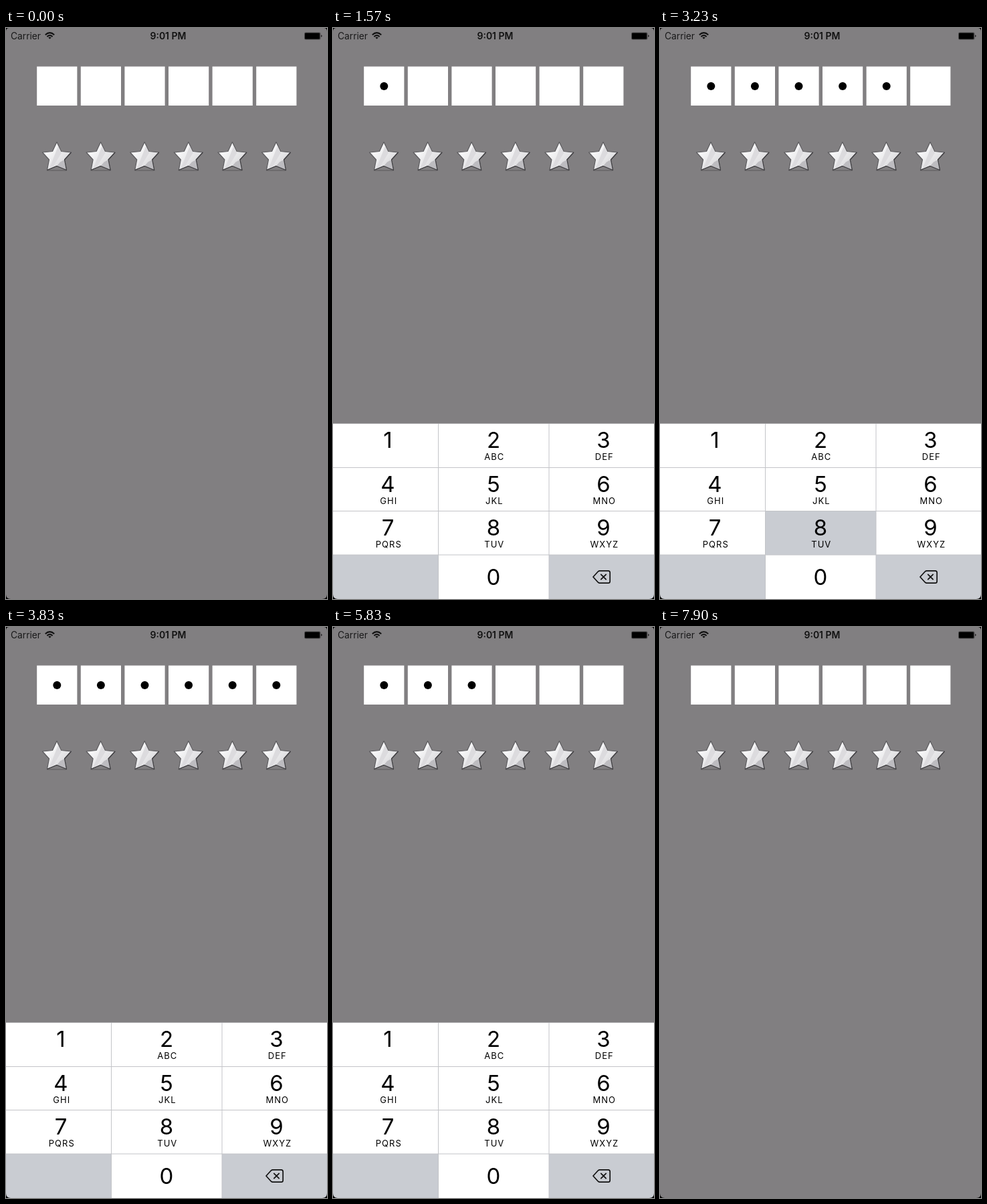
An HTML page for the animation above (8 s loop, 480x854 px).

```html
<!DOCTYPE html>
<html lang="en">
<head>
<meta charset="utf-8">
<title>Passcode entry</title>
<style>
  html, body { margin: 0; width: 100%; height: 100%; overflow: hidden; background: #000; }
  svg { display: block; width: 480px; height: 854px; }
  text { font-family: Inter, Roboto, "Liberation Sans", sans-serif; text-anchor: middle; }
  .digit { font-size: 33px; }
  .letters { font-size: 13px; letter-spacing: 1px; }
</style>
</head>
<body>
<svg viewBox="0 0 480 854">
  <defs>
    <linearGradient id="shine" x1="0" y1="0" x2="1" y2="1">
      <stop offset=".3" stop-color="#f6f6f7"/>
      <stop offset="1" stop-color="#cfced1"/>
    </linearGradient>
    <g id="star" stroke-linejoin="round">
      <path d="M-15 20.500H15" stroke="#4b4a4c" stroke-width="1.2" opacity=".6"/>
      <path d="M0-22 6.500-8 21.500-6.500 11.500 4.500 14.500 20 0 14-14.500 20-11.500 4.500-21.500-6.500-6.500-8Z"
            fill="url(#shine)" stroke="#5b5a5d" stroke-width="1.2"/>
      <path d="M2-16 7-6-5 14-11 17Z" fill="#dcdbde"/>
      <path d="M11.500 4.500 14.500 20 0 14 5 8Z" fill="#bdbcc0"/>
      <path d="M21.500-6.500 11.500 4.500 14.500 20 0 14-14.500 20" fill="none" stroke="#3f3e41" stroke-width="1.2"/>
    </g>
  </defs>

  <rect width="480" height="854" fill="#817f81"/>
  <text x="29.500" y="17" font-size="13.800" fill="#19191a">Carrier</text>
  <g fill="none" stroke="#111" stroke-width="2">
    <path d="M58.800 10.200Q65.500 4 72.200 10.200M61.400 12.900Q65.500 9.200 69.600 12.900"/>
    <path d="M63.300 14.300Q65.500 12.600 67.700 14.300L65.500 16.500Z" fill="#111" stroke="none"/>
  </g>
  <text x="242.500" y="17" font-size="14" font-weight="600" fill="#111">9:01 PM</text>
  <rect x="446" y="6.500" width="24.500" height="11" rx="2" opacity=".4"/>
  <rect x="447" y="7.500" width="22" height="9" rx="1"/>
  <path d="M471.300 10.300q2.500 1.700 0 3.400Z"/>

  <g id="slots"></g>
  <g id="pad"><rect y="591" width="480" height="264" fill="#fff"/></g>

  <path d="M0 0H480V854H0ZM5 0Q0 0 0 5V847Q0 854 7 854H473Q480 854 480 847V5Q480 0 475 0Z"
        fill-rule="evenodd"/>
</svg>
<script>
const LOOP = 8000, STEP = 1000 / 15, PAD_HEIGHT = 263;
const GRAY = '#c9ccd2', WHITE = '#fff';
const COLS = [0, 157.5, 323, 480], ROWS = [591, 657.5, 722.5, 788, 855];
const CENTERS = [82, 240, 404.5], BASELINES = [628, 693.8, 759, 832.5];
const KEYS = '123456789 0<';
const LETTERS = ['', 'ABC', 'DEF', 'GHI', 'JKL', 'MNO', 'PQRS', 'TUV', 'WXYZ'];

// key, press time, release time
const PRESSES = [
  ['2', 1430, 1570], ['3', 1830, 1970], ['6', 2370, 2430],
  ['5', 2770, 2900], ['8', 3100, 3300], ['7', 3700, 3830],
  ['<', 4970, 5100], ['<', 5370, 5500], ['<', 5700, 5830], ['<', 5970, 6100],
  ['<', 6500, 6630], ['<', 6830, 6970], ['<', 7100, 7230]
];

const slots = document.getElementById('slots');
const pad = document.getElementById('pad');

function add(parent, tag, attrs, text = '') {
  const node = document.createElementNS('http://www.w3.org/2000/svg', tag);
  for (const name in attrs) node.setAttribute(name, attrs[name]);
  node.textContent = text;
  return parent.appendChild(node);
}

const dots = Array.from({ length: 6 }, (_, i) => {
  const cx = 76.3 + i * 65.6;
  add(slots, 'rect', { x: cx - 30.1, y: 57.6, width: 60.2, height: 58.4, fill: WHITE });
  add(slots, 'use', { href: '#star', x: cx - .3, y: 192.5 });
  return add(slots, 'circle', { cx, cy: 87, r: 6 });
});

const keys = [...KEYS].map((key, i) => {
  const col = i % 3, row = Math.floor(i / 3);
  const x = COLS[col], y = ROWS[row];
  const rect = add(pad, 'rect', { x, y, width: COLS[col + 1] - x, height: ROWS[row + 1] - y });
  if (key !== '<') add(pad, 'text', { class: 'digit', x: CENTERS[col], y: BASELINES[row] }, key);
  if (LETTERS[i]) {
    add(pad, 'text', { class: 'letters', x: CENTERS[col] + 1.3, y: BASELINES[row] + 17.8 }, LETTERS[i]);
  }
  return rect;
});
add(pad, 'path', {
  d: 'M0 657.500H480M0 722.500H480M0 788H480M157.500 591V854M323 591V854',
  stroke: '#c3c4c8', fill: 'none'
});
add(pad, 'path', { d: 'M0 591.500H480', stroke: '#a3a2a5' });
const eraser = add(pad, 'path', {
  d: 'M389 821 396.500 812.800Q397.500 811.800 399 811.800H411.500Q414.200 811.800 414.200 814.500V827.500Q414.200 830.200 411.500 830.200H399Q397.500 830.200 396.500 829.200Z',
  stroke: '#111', 'stroke-width': 1.7, 'stroke-linejoin': 'round'
});
const cross = add(pad, 'path', {
  d: 'M400.300 816.800 408.700 825.200M408.700 816.800 400.300 825.200', 'stroke-width': 1.7
});

// Critically damped spring from 0 to 1
function spring(ms) {
  const x = Math.max(0, ms) * .0183;
  return 1 - (1 + x) * Math.exp(-x);
}

function padOffset(t) {
  if (t < 499 || t > 7895) return PAD_HEIGHT + 2;
  const shown = t < 4000 ? spring(t - 450) : 1 - spring(t - 7450);
  return PAD_HEIGHT * (1 - shown);
}

function draw(t) {
  let count = 0, active = '';
  for (const [key, down, up] of PRESSES) {
    if (t < down) break;
    count = Math.max(0, count + (key === '<' ? -1 : 1));
    if (t < up) active = key;
  }
  dots.forEach((dot, i) => dot.setAttribute('visibility', i < count ? 'visible' : 'hidden'));
  keys.forEach((rect, i) => {
    const special = KEYS[i] === ' ' || KEYS[i] === '<';
    rect.setAttribute('fill', special !== (KEYS[i] === active) ? GRAY : WHITE);
  });
  const erasing = active === '<';
  eraser.setAttribute('fill', erasing ? '#111' : 'none');
  cross.setAttribute('stroke', erasing ? WHITE : '#111');
  pad.setAttribute('transform', `translate(0 ${padOffset(t)})`);
}

// The screen refreshes fifteen times a second
function snap(t) {
  return 504 + Math.floor((t - 490) / STEP) * STEP;
}

const start = performance.now();
function tick() {
  draw(snap((performance.now() - start) % LOOP));
  requestAnimationFrame(tick);
}
tick();
</script>
</body>
</html>
```
